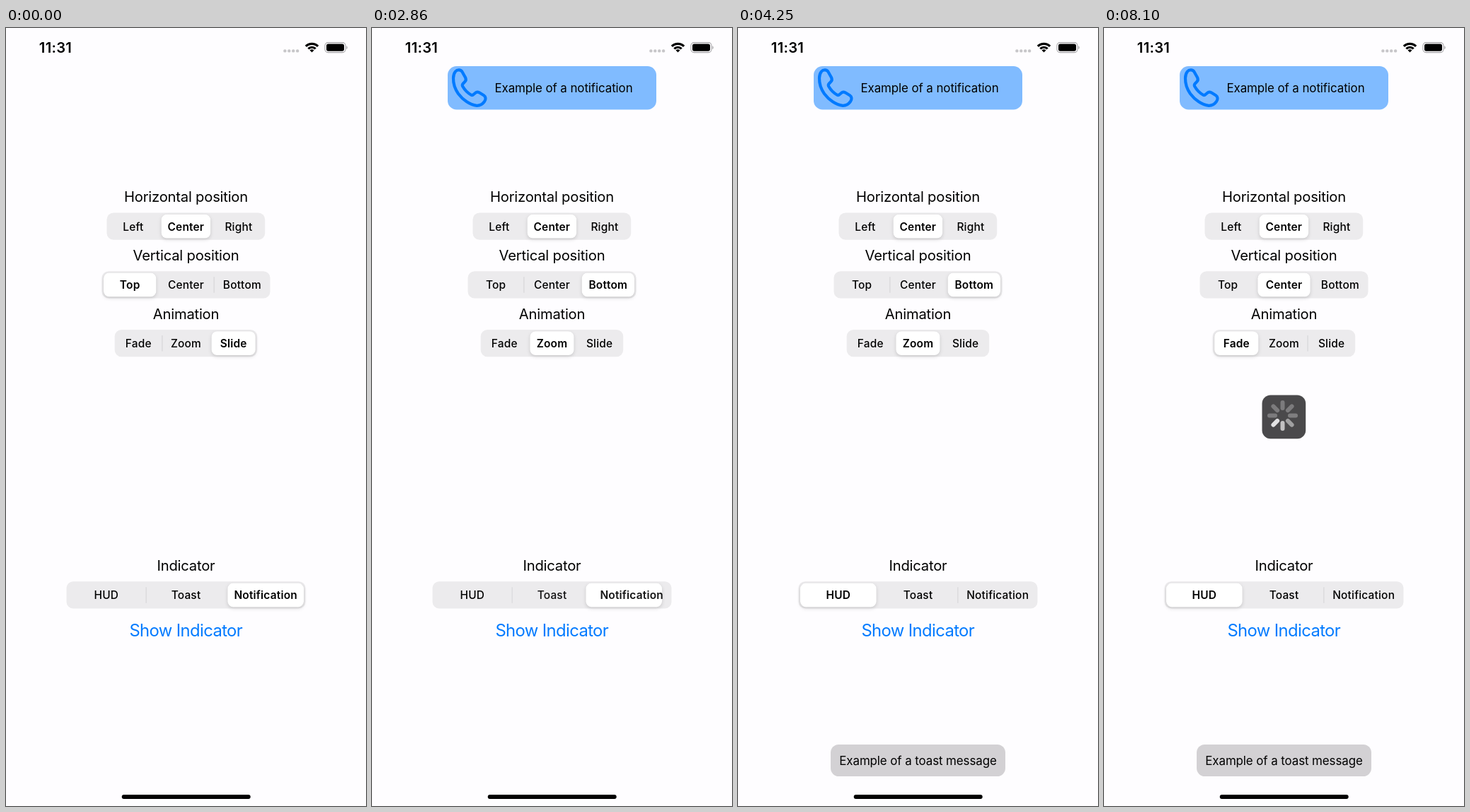
Animation, 509 px wide and 1101 px high, one loop 8.14 s. Source, as an HTML page:

```html
<!DOCTYPE html>
<html lang="en">
<head>
<meta charset="utf-8">
<title>Indicator demo</title>
<style>
  html, body { margin: 0; width: 100%; height: 100%; overflow: hidden; background: #fefdff; }
  svg { display: block; width: 509px; height: 1101px; }
  text { font-family: Inter, "Liberation Sans", sans-serif; text-anchor: middle; fill: #000; }
  .head { font-size: 20.2px; letter-spacing: -.2px; }
  .seg { font-size: 15.45px; font-weight: 500; letter-spacing: .2px; }
  .seg.bold { font-weight: 600; }
  .msg { font-size: 16.9px; letter-spacing: -.08px; }
  .time { font-size: 20.2px; font-weight: 600; letter-spacing: .3px; }
  .link { font-size: 23.8px; letter-spacing: -.6px; fill: #007aff; }
  .pill { fill: #fff; filter: drop-shadow(0 2px 2.5px rgba(0,0,0,.14)) drop-shadow(0 0 .6px rgba(0,0,0,.1)); }
</style>
</head>
<body>
<svg id="stage" viewBox="0 0 509 1101" xmlns="http://www.w3.org/2000/svg">
  <rect width="509" height="1101" fill="#fefdff"/>
  <g id="controls"></g>
  <text id="link" class="link" x="254.3" y="861">Show Indicator</text>

  <g id="note">
    <rect x="107" y="54" width="295" height="61.5" rx="12.5" fill="#80bbff"/>
    <path fill="none" stroke="#007aff" stroke-width="4.2" stroke-linejoin="round"
      d="M118 61.5C120.5 58.6 125.5 58.6 127.5 62L132 70C133.3 72.5 133 74.3 131.3 76L128.7 78.7C127.4 80 127.4 81 128.3 82.8C131 87.5 135.5 92 139.8 94.5C141.3 95.4 142.4 95.3 143.6 94L146.2 91.8C147.8 90.3 149.5 90.2 151.5 91.3L158 95.3C161 97.3 161.3 101 159 104C156 108.3 152 110 148 109.8C138 109 128 101 122 93C117.5 86.5 114.8 79 115 71C115 67 116 64 118 61.5Z"/>
    <text class="msg" x="271" y="91">Example of a notification</text>
  </g>

  <g id="toast">
    <rect x="131" y="1014" width="247" height="45" rx="11.5" fill="#d3d1d4"/>
    <text class="msg" x="254.5" y="1042.5">Example of a toast message</text>
  </g>

  <g id="hud">
    <rect x="223.5" y="519.5" width="61.7" height="61.7" rx="12" fill="#4a494b"/>
    <g id="spinner" transform="translate(252.5 548.5)"></g>
  </g>

  <text class="time" x="70" y="35">11:31</text>
  <g id="dots" fill="#c7c6c9"></g>
  <g transform="translate(432.5 34.5)">
    <path id="wifiOuter" fill="none" stroke="#000" stroke-width="3.2"/>
    <path id="wifiInner" fill="none" stroke="#000" stroke-width="3"/>
    <path id="wifiTip"/>
  </g>
  <rect x="451" y="20.6" width="29" height="14" rx="4.3" fill="none" stroke="#a5a4a7" stroke-width="1.1"/>
  <rect x="453" y="22.5" width="25" height="10.2" rx="2.6"/>
  <path d="M481.3 25.2C483.2 26 483.2 29.2 481.3 30Z" fill="#a5a4a7"/>
  <rect x="163.7" y="1084.9" width="182" height="6" rx="3"/>
</svg>

<script>
const LOOP = 8140, NS = 'http://www.w3.org/2000/svg';
const $ = id => document.getElementById(id);
const clamp = v => Math.max(0, Math.min(1, v));
const span = (t, a, b) => clamp((t - a) / (b - a));

function add(parent, tag, attrs, text) {
  const el = document.createElementNS(NS, tag);
  for (const k in attrs) el.setAttribute(k, attrs[k]);
  if (text) el.textContent = text;
  parent.appendChild(el);
  return el;
}

// cubic-bezier(.42, 0, .58, 1)
function ease(x) {
  let lo = 0, hi = 1, s = x;
  for (let i = 0; i < 24; i++) {
    s = (lo + hi) / 2;
    const bx = 1.26 * (1 - s) ** 2 * s + 1.74 * (1 - s) * s * s + s ** 3;
    if (bx < x) lo = s; else hi = s;
  }
  return x <= 0 ? 0 : x >= 1 ? 1 : s * s * (3 - 2 * s);
}

// moves: [start, end, from, to]
const controls = [
  { title: 'Horizontal position', x: 142.5, y: 261.5, w: 223.7, items: ['Left', 'Center', 'Right'], start: 1, moves: [] },
  { title: 'Vertical position', x: 135.5, y: 344.2, w: 238, items: ['Top', 'Center', 'Bottom'], start: 0,
    moves: [[1410, 1690, 0, 2], [5220, 5460, 2, 1]] },
  { title: 'Animation', x: 153.7, y: 427, w: 201.5, items: ['Fade', 'Zoom', 'Slide'], start: 2,
    moves: [[2020, 2250, 2, 1], [4660, 4940, 1, 0]] },
  { title: 'Indicator', x: 85.5, y: 783.3, w: 338, items: ['HUD', 'Toast', 'Notification'], start: 2,
    moves: [[2800, 3080, 2, 1], [3970, 4250, 1, 0]] }
];

function buildControl(c) {
  const g = $('controls'), mid = 254.5;
  c.cell = c.w / 3;
  add(g, 'text', { class: 'head', x: mid, y: c.y - 15.1 }, c.title);
  add(g, 'rect', { x: c.x, y: c.y, width: c.w, height: 38.3, rx: 9.5, fill: '#ecebed' });
  c.seps = [1, 2].map(b => add(g, 'rect', {
    x: c.x + b * c.cell - .6, y: c.y + 8, width: 1.2, height: 22.5, fill: '#d7d6d9' }));
  c.pill = add(g, 'rect', { class: 'pill', y: c.y + 2.3, width: c.cell - 5, height: 33.8, rx: 7.8 });
  c.labels = c.items.map((s, i) => ['seg', 'seg bold'].map(cls => add(g, 'text', {
    class: cls, x: c.x + (i + .5) * c.cell, y: c.y + 25 }, s)));
}

function drawControl(c, t) {
  let from = c.start, to = c.start, k = 1;
  for (const [a, b, f, n] of c.moves)
    if (t >= a) { from = f; to = n; k = ease(span(t, a, b)); }
  const pos = from + (to - from) * k;
  c.pill.setAttribute('x', c.x + pos * c.cell + 2.5);
  c.seps.forEach((s, i) => s.setAttribute('opacity', clamp(Math.abs(i + .5 - pos) - .5)));
  c.labels.forEach(([plain, bold], i) => {
    const on = i === to ? k : i === from ? 1 - k : 0;
    plain.setAttribute('opacity', 1 - on);
    bold.setAttribute('opacity', on);
  });
}

function arc(r) {
  const d = r * Math.SQRT1_2;
  return `M${-d} ${-d}A${r} ${r} 0 0 1 ${d} ${-d}`;
}

controls.forEach(buildControl);
for (let i = 0; i < 4; i++) add($('dots'), 'circle', { cx: 394.4 + i * 5.9, cy: 32.4, r: 2.2 });
$('wifiOuter').setAttribute('d', arc(12.2));
$('wifiInner').setAttribute('d', arc(7.3));
$('wifiTip').setAttribute('d', arc(4.2) + 'L0 0Z');
const spokes = Array.from({ length: 8 }, (_, i) => add($('spinner'), 'rect', {
  x: -3, y: -21.5, width: 6, height: 14, rx: 3, fill: '#fff', transform: `rotate(${i * 45})` }));

function drawSpinner(t) {
  const lead = 7.4 + (t - 6980) / 80;
  spokes.forEach((s, i) => {
    const d = (((lead - i) % 8) + 8) % 8;
    const glow = Math.max(clamp(1 - d / 3.5), clamp((d - 7.5) * 2));
    s.setAttribute('opacity', .28 + .64 * glow);
  });
}

function linkAlpha(t) {
  const tap = [6020, 3250, 560].find(a => t >= a);
  return tap === undefined ? 1 : .2 + .8 * span(t, tap + 48, tap + 160);
}

function draw(t) {
  controls.forEach(c => drawControl(c, t));
  $('link').setAttribute('opacity', linkAlpha(t));

  const drop = -118 * (1 - ease(span(t, 595, 1080)));
  $('note').setAttribute('transform', `translate(0 ${drop})`);

  const zoom = 1.5 - .5 * ease(span(t, 3285, 3785));
  $('toast').setAttribute('visibility', t < 3285 ? 'hidden' : 'visible');
  $('toast').setAttribute('transform', `translate(254.5 1036.5) scale(${zoom}) translate(-254.5 -1036.5)`);

  $('hud').setAttribute('opacity', ease(span(t, 6060, 6560)));
  drawSpinner(t);
}

function tick() {
  draw(performance.now() % LOOP);
  requestAnimationFrame(tick);
}
tick();
</script>
</body>
</html>
```
